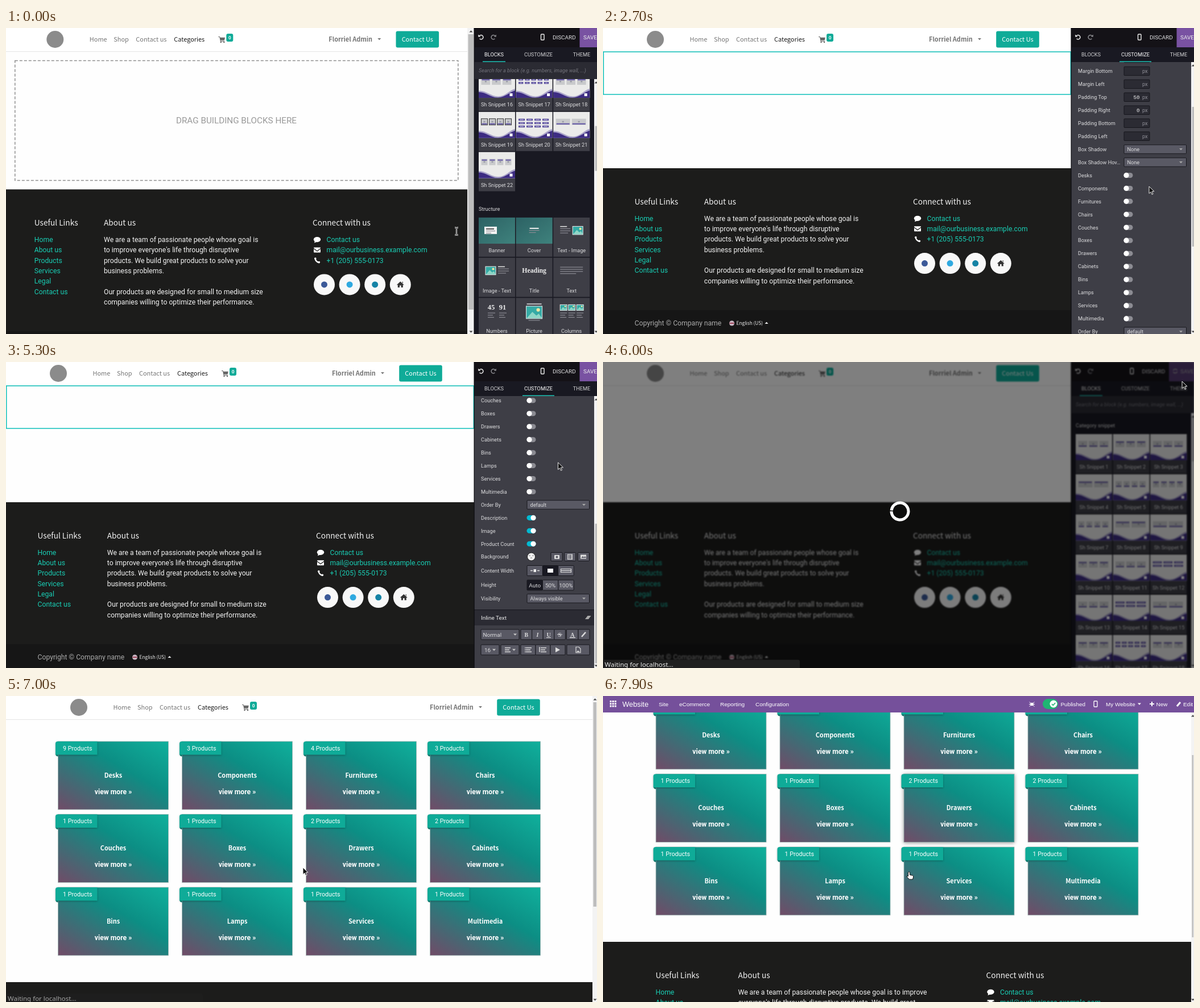
Recreate the animation shown at these times as an HTML page. Size 1039 by 539 pixels, loop 8 s.

```html
<!DOCTYPE html>
<html lang="en">
<head>
<meta charset="utf-8">
<title>Website builder</title>
<style>
html, body { margin: 0; width: 100%; height: 100%; overflow: hidden; background: #fefefe; }
svg { display: block; }
text { font-family: Roboto, sans-serif; white-space: pre; }
.s { font-family: "Noto Sans CJK SC", "Noto Sans CJK JP", "Noto Sans CJK", sans-serif; }
.a { font-family: "Liberation Sans", sans-serif; }
.n { font-family: "Noto Sans", sans-serif; }
.f { font-family: "Liberation Serif", serif; }
.c { font-family: "Liberation Mono", monospace; }
.b { font-weight: 700; }
.i { font-style: italic; }
.m { text-anchor: middle; }
.e { text-anchor: end; }
</style>
</head>
<body>
<svg width="1039" height="539" viewBox="0 0 1039 539">
  <defs>
    <linearGradient id="card" gradientUnits="userSpaceOnUse" x1="47" y1="147" x2="147" y2="-27">
      <stop stop-color="#714b67"/><stop offset=".6" stop-color="#0c8e84"/><stop offset="1" stop-color="#10b09c"/>
    </linearGradient>
    <linearGradient id="cover" x2="1" y2="1">
      <stop stop-color="#2c6264"/><stop offset="1" stop-color="#3f827d"/>
    </linearGradient>
  </defs>
  <g id="stage"></g>
</svg>
<script>
const TEAL = '#0fab98', LINK = '#19cdb4', PURPLE = '#75509b', INK = '#3d2c82';
const PANEL = '#3e3e46', DARK = '#191922', MID = '#2b2b33', BUTTON = '#595964', LABEL = '#dcdcde';
const SMALL = 9.17, MENU = 9.93, BODY = 12.2, NAV = 10.95;

const rect = (x, y, w, h, fill, more = '') => `<rect x="${x}" y="${y}" width="${w}" height="${h}" fill="${fill}" ${more}/>`;
const circle = (x, y, r, fill, more = '') => `<circle cx="${x}" cy="${y}" r="${r}" fill="${fill}" ${more}/>`;
const path = (d, fill, more = '') => `<path d="${d}" fill="${fill}" ${more}/>`;
const line = (d, color, width = 1.2) => path(d, 'none', `stroke="${color}" stroke-width="${width}"`);
const group = (x, y, body, more = '') => `<g transform="translate(${x} ${y})" ${more}>${body}</g>`;
const clip = (x, y, w, h, body) =>
  `<svg x="${x}" y="${y}" width="${w}" height="${h}" viewBox="${x} ${y} ${w} ${h}">${body}</svg>`;
// y is the middle of the capital letters
const text = (x, y, str, size, fill, cls = '') =>
  `<text x="${x}" y="${y + size * .355}" font-size="${size}" fill="${fill}" class="${cls}">${str}</text>`;
const list = (items, fn) => items.map(fn).join('');
const times = (n, fn) => list([...Array(n).keys()], fn);
const caret = (x, y, color, d = 1) => path(`M${x - 3} ${y - 1.5 * d}h6l-3 ${3.2 * d}z`, color);

// linear interpolation over [time, ...values]
function track(keys, t) {
  const k = keys.findIndex(key => key[0] > t);
  if (k < 0) return keys.at(-1).slice(1);
  const [a, b] = [keys[k - 1], keys[k]], p = (t - a[0]) / (b[0] - a[0]);
  return a.slice(1).map((v, i) => v + (b[i + 1] - v) * p);
}

function scrollbar(x, y, w, bottom, thumbY, thumbH) {
  const mid = x + w / 2 + .5;
  return rect(x, y, w, bottom - y, '#f3f3f3') + rect(x + 1.5, thumbY, w - 2.5, thumbH, '#bdbdbd') +
    caret(mid, y + 6, '#444', -1) + caret(mid, bottom - 4, '#444');
}

// ---------- web page ----------
function nav(dx, right, width) {
  const item = (x, s, fill = '#777') => text(x, 20.3, s, NAV, fill, 's');
  return rect(0, 0, width, 41, '#fff') + rect(0, 41, width, 1, '#e4e4e4') +
    group(dx, 0, circle(92, 20, 15, '#8b8b8b') + item(152.5, 'Home') + item(195, 'Shop') + item(234, 'Contact us') +
      item(301, 'Categories', '#1c1c1c') +
      path('M379 15h2.6l.6 1.8h8.6l-1.2 5h-6.4l.2 1h6.4v1h-7.2l-1.6-7.8H379z', '#666') +
      circle(383.5, 25, 1.2, '#666') + circle(389, 25, 1.2, '#666') +
      rect(393, 10, 12, 14, TEAL, 'rx="3"') + text(399, 17, '0', 8, '#fff', 's b m')) +
    group(right, 0, text(573, 20.3, 'Florriel Admin', NAV, '#757575', 's b') + caret(662, 19.5, '#757575') +
      rect(691.2, 5.5, 75.6, 29, TEAL, 'rx="3"') + text(729, 20.3, 'Contact Us', NAV, '#fff', 's m'));
}

const NARROW = ['We are a team of passionate people whose goal is', "to improve everyone's life through disruptive",
  'products. We build great products to solve your', 'business problems.', '',
  'Our products are designed for small to medium size', 'companies willing to optimize their performance.'];
const WIDE = ['We are a team of passionate people whose goal is to improve',
  "everyone's life through disruptive products. We build great", 'products to solve your business problems.'];

function footer(top, [x1, x2, x3], lines, width) {
  const row = i => 88.3 + 18.35 * i;
  const head = (x, s) => text(x, 58.7, s, 13.65, '#f2f2f2', 's');
  const column = (x, items, fill) => list(items, (s, i) => text(x, row(i), s, BODY, fill));
  return group(0, top, rect(0, 0, width, 700, '#1c1c1b') + rect(0, 250, width, 700, '#161616') +
    head(x1, 'Useful Links') + head(x2, 'About us') + head(x3, 'Connect with us') +
    column(x1, ['Home', 'About us', 'Products', 'Services', 'Legal', 'Contact us'], LINK) +
    column(x2, lines, '#f4f4f4') +
    column(x3 + 24.5, ['Contact us', 'mail@ourbusiness.example.com', '+1 (205) 555-0173'], LINK) +
    group(x3 + 8, row(0), '<ellipse rx="6.2" ry="4.6" fill="#fff"/>' + path('M-4 2l-1 4 5-2z', '#fff')) +
    group(x3 + 8, row(1), rect(-6, -4.5, 12, 9, '#fff', 'rx="1"') + line('M-6-2.5L0 2 6-2.5', '#1c1c1b')) +
    group(x3 + 8, row(2), line('M-3.5-4Q-3 2.5 4 4', '#fff', 2.4) + circle(-3.2, -3.3, 1.8, '#fff') + circle(3.3, 3.3, 1.8, '#fff')) +
    list(['#3b5998', '#2fa9e0', '#1583a5', ''], (color, i) => group(x3 + 20.5 + 44.6 * i, 167.6,
      circle(0, 0, 18.5, '#f8f8f8') + (color ? circle(0, 0, 5.5, color)
        : path('M0-5.5L6.5 .5H4.5V5H1.3V1.5h-2.6V5h-3.2V.5h-2zM2.8-5h1.8v3z', '#333')))) +
    text(x1, 272.7, 'Copyright © Company name', BODY, '#aaa') +
    circle(x1 + 171, 273, 4.5, '#c9b7c4') + rect(x1 + 167, 272, 8, 2, '#a0485c') +
    text(x1 + 179, 272.7, 'English (US)', 8.3, '#f0f0f0', 's') + caret(x1 + 232, 272.5, '#f0f0f0', -1));
}

function editedPage(dropped, selected) {
  if (!dropped) return rect(0, 0, 823, 539, '#fefefe') + nav(-5.7, -5.7, 811) +
    rect(15.8, 57.5, 779, 211, 'none', 'stroke="#8f8f8f" stroke-width="1.5" stroke-dasharray="5 3"') +
    text(405, 163, 'DRAG BUILDING BLOCKS HERE', 15.25, '#999', 'm') +
    footer(284.3, [49.8, 172, 539], NARROW, 811) + scrollbar(811, 0, 12, 539, 11, 485);
  return rect(0, 0, 823, 539, '#fefefe') + nav(0, 0, 823) + footer(247, [55.5, 177.8, 545], NARROW, 823) +
    (selected ? rect(.75, 42, 821.5, 75, 'none', 'stroke="#1cc4bd" stroke-width="1.6"') : '');
}

// ---------- editor: blocks ----------
const cell = (i, top, label, art) => group(831 + i % 3 * 65.6, top + Math.floor(i / 3) * 70.75,
  rect(0, 0, 64, 69, PANEL) + art + text(32, 58, label, SMALL, LABEL, 'm'));

const LAYOUTS = '31 31 31 21 41 41 41 21 21 31 31 32 31 32 21 31 52 31 41 43 21 41'.split(' ');
function snippet(layout, i) {
  const [cols, rows] = [...layout].map(Number), w = 56 / cols;
  const item = k => {
    const x = 4.5 + k % cols * w, y = 12 + Math.floor(k / cols) * 6;
    if (rows > 1) return rect(x, y, w - 3, 3.4, '#54489a') + rect(x + 2, y + 1.2, w - 7, 1, '#c9c5e2');
    return rect(x, y, w - 3, 11, '#c9cacc', i == 18 ? 'stroke="#333"' : '') +
      rect(x + 1, y + (i % 2 ? 1 : 8), w - 5, 2.2, '#6b60a8') + rect(x + w / 2 - 3, y + 4, 3, 2.5, '#989aa6');
  };
  return cell(i, 127, `Sh Snippet ${i + 1}`, rect(0, 0, 64, 46, '#ebebea') + times(cols * rows, item) +
    path('M0 33.5C14 33 22 44 35 43.5S54 32 64 30V46H0Z', '#a9a3c8') +
    path('M0 36C12 35 21 46 34 45.5S54 36 64 33V46H0Z', INK) + rect(54.5, 38, 5, 5, '#fff'));
}

const bars = (x, y, widths) => list(widths, (w, i) => rect(x, y + i * 3.8, w, 1.2, '#8c8c94'));
const picture = (x, y, w, h) => rect(x, y, w, h, '#35aaa5', 'stroke="#eee"') + circle(x + w * .75, y + h * .3, h * .14, '#f6e7a0') +
  path(`M${x + 1} ${y + h - 1}l${w * .35} ${-h * .5} ${w * .25} ${h * .3} ${w * .15} ${-h * .15} ${w * .2} ${h * .35}z`, '#8fd6c6');
const serif = (x, y, s, size) => text(x, y, s, size, '#eee', 'f b m');
const STRUCTURE = {
  'Banner': rect(0, 0, 64, 46, 'url(#cover)') + rect(10, 16, 22, 13, '#f3f3f3') + rect(13, 19, 14, 2, '#555') + bars(13, 23, [16, 9]),
  'Cover': rect(0, 0, 64, 46, 'url(#cover)') + rect(24, 18, 16, 2, '#eee') + bars(23, 22, [18, 12]),
  'Text - Image': rect(12, 15, 12, 1.6, '#ddd') + bars(12, 19, [18, 18, 14]) + picture(34, 15.5, 18, 14.5),
  'Image - Text': picture(12, 15.5, 18, 14.5) + rect(34, 15, 12, 1.6, '#ddd') + bars(34, 19, [19, 19, 14]),
  'Title': serif(32, 22, 'Heading', 11.8),
  'Text': bars(12, 16, [40, 40, 40, 28]),
  'Numbers': serif(22, 16, '45', 12.5) + serif(42, 16, '91', 12.5) + bars(16, 26, [13, 9, 11]) + bars(36, 26, [13, 9, 11]),
  'Picture': rect(19, 10, 26, 1.6, '#ddd') + picture(18, 14.5, 28, 22) + bars(22, 39, [20]),
  'Columns': times(3, i => picture(12 + i * 14.5, 12, 12, 10) + bars(12 + i * 14.5, 26, [12, 9, 11])),
};

function blocks(scroll) {
  return rect(823, 60, 216, 30, MID) +
    text(831, 75, 'Search for a block (e.g. numbers, image wall, ...)', SMALL, '#74747c', 'i') +
    clip(823, 90, 211, 449, group(0, -scroll, text(831, 112, 'Category snippet', SMALL, LABEL) + list(LAYOUTS, snippet) +
      text(831, 722.5, 'Structure', SMALL, LABEL) +
      list(Object.keys(STRUCTURE), (name, i) => cell(i, 737.6, name, STRUCTURE[name])))) +
    scrollbar(1034, 90, 6, 539, 96 + scroll * .19, 79);
}

// ---------- editor: options ----------
const ROWS = ['Columns', 'Border', 'Radius', 'Margin Top', 'Margin Right', 'Margin Bottom', 'Margin Left',
  'Padding Top', 'Padding Right', 'Padding Bottom', 'Padding Left', 'Box Shadow', 'Box Shadow Hov…',
  'Desks', 'Components', 'Furnitures', 'Chairs', 'Couches', 'Boxes', 'Drawers', 'Cabinets', 'Bins', 'Lamps',
  'Services', 'Multimedia', 'Order By', 'Description', 'Image', 'Product Count', 'Background'];
const VALUES = { 'Padding Top': '50', 'Padding Right': '0', 'Order By': 'default' };
const SWITCHED = { 'Description': 4000, 'Image': 4600, 'Product Count': 5100 };

const box = (x, y, w, h, fill, body = '') => rect(x, y - h / 2, w, h, fill, 'stroke="#17171d" rx="1"') + body;
const select = (y, s) => box(916, y, 109.5, 15.5, BUTTON, text(921.5, y, s, SMALL, LABEL) + caret(1016, y, '#aaa'));
const button = (x, y, w, s = '', cls = 'm', fill = BUTTON) => box(x, y, w, 18, fill, text(x + w / 2, y, s, MENU, LABEL, cls));

function option(name, i, t) {
  const y = -38.9 + 22.95 * i, on = t >= SWITCHED[name];
  let control = '';
  if (i < 11) control = box(916, y, 45, 15.5, MID, text(943.5, y, VALUES[name] || '', SMALL, '#eee', 'c e') + text(948, y, 'px', SMALL, '#909098'));
  else if (i < 13 || i == 25) control = select(y, VALUES[name] || 'None');
  else if (i < 29) control = rect(915.5, y - 4.5, 16, 9, on ? '#01bad2' : '#8b8b92', 'rx="4.5"') + circle(on ? 927 : 920, y, 4.6, '#fff');
  return text(835, y, name, SMALL, LABEL) + control;
}

function lowerOptions() {
  const label = (y, s) => text(835, y, s, SMALL, LABEL);
  const lines = (x, y) => line(`M${x} ${y - 3.5}h10m-10 3.5h8m-8 3.5h10`, '#ddd', 1.5);
  return circle(923.5, 343, 7, '#f4f4f4', 'stroke="#222"') + line('M919 341h3m3 0h3m-6 4h3', '#bbb', 2.5) +
    times(3, i => box(958 + i * 23.7, 343, 20, 15, BUTTON)) +
    rect(964, 340, 9, 7, '#ddd', 'rx="1"') + circle(968.5, 343.5, 2, BUTTON) +
    line('M987.5 339v8.5h8V339zM990 339v9m3.5-9v9', '#ddd') + rect(1010, 339.5, 10, 7, '#ddd') + path('M1011 345l3-3 2 2 2-2 2 3z', BUTTON) +
    label(367.5, 'Content Width') + times(3, i => button(916 + i * 27.4, 367.5, 27.4, '', 'm', i == 1 ? DARK : BUTTON)) +
    line('M922 367.5h4m8 0h4m38 0h17', '#ddd', 1.5) + rect(927.5, 365, 4.5, 5, '#eee') + rect(952, 364, 10, 7, '#fff') +
    line('M975.5 364.5h18v6h-18z', '#ddd') +
    label(393, 'Height') + list(['Auto', '50%', '100%'], (s, i) => button(916 + i * 27.4, 393, 27.4, s, 'm', i ? BUTTON : DARK)) +
    label(416.5, 'Visibility') + select(416.5, 'Always visible') +
    rect(823, 436, 211, 28, MID) + rect(823, 436, 211, 1, '#17171d') + text(835, 450.5, 'Inline Text', MENU, '#eee') +
    path('M1018 453l4.5-6h6l-4.5 6z', '#aaa') +
    box(835, 480, 67, 18, BUTTON, text(838.5, 480, 'Normal', MENU, LABEL) + caret(895, 480, '#ccc')) +
    list([...'BIUS'], (s, i) => button(905 + i * 19.6, 480, 19.6, s, 'f b m' + (i == 1 ? ' i' : ''))) +
    line('M950 485.5h8m11-5.5h9', '#ddd') +
    button(985.5, 480, 20.5, 'A', 'f b m') + line('M991 485.5h10', '#eee') +
    button(1006, 480, 20, '') + line('M1012 484l7-8', '#ddd', 2.4) +
    box(835, 507, 32, 18, BUTTON, text(841, 507, '16', MENU, LABEL) + caret(858, 507, '#ccc')) +
    box(870, 507, 32, 18, BUTTON, lines(877, 507) + caret(893, 507, '#ccc')) +
    times(3, i => button(905 + i * 26, 507, 26)) + lines(914, 507) + lines(940, 507) +
    line('M912 503.5h1.5m-1.5 3.5h1.5m-1.5 3.5h1.5M938 502v9', '#ddd', 1.5) + path('M966 502.5l8 4.5-8 4.5z', '#ddd') +
    button(986, 507, 40) + line('M1002 502h5l3 3v7h-8z', '#ddd') + path('M1003 511l2.5-3 3.5 3z', '#ddd');
}

function customize(t) {
  const [scroll] = track([[0, 0], [2400, 0], [2700, 136], [3300, 419.4]], t);
  return rect(823, 60, 216, 479, PANEL) + clip(823, 60, 211, 479, group(0, 136 - scroll,
    rect(823, -76, 211, 25, MID) + text(835, -63, 'Category snippet', MENU, '#eee') +
    list(ROWS, (name, i) => option(name, i, t)) + group(0, 283.4, lowerOptions()))) +
    scrollbar(1034, 60, 6, 539, 69 + scroll * .5145, 246);
}

function sidebar(t, saving) {
  const customizing = t >= 1900 && !saving, dx = saving ? -13.5 : 0;
  const turn = (x, flip, color) => group(x, 16, `<g transform="scale(${flip} 1)">` +
    line('M-2.6-2.2A3.7 3.7 0 1 1-2.4 2.8', color, 1.5) + path('M-4.8-4.6v4.2h4.2z', color) + '</g>');
  const tab = (x, s, half, on) => text(x, 47, s, SMALL, on ? '#fff' : '#d2d2d4', 'm') +
    (on ? rect(x - half, 58.5, half * 2, 1.8, '#1cc1b4') : '');
  const save = rect(1008.5 + dx, 0, 60, 34, '#7952a2') + text(1015, 16.5, 'SAVE', MENU, '#eee') +
    (saving ? group(1006, 16, line('M-3.5-1A3.8 3.8 0 0 1 3.5-1.5M3.5 1A3.8 3.8 0 0 1-3.5 1.5', '#eee', 1.5)) : '');
  return rect(823, 0, 216, 539, DARK) + rect(823, 0, 216, 34, '#141217') +
    turn(835, 1, '#eee') + turn(857, -1, '#8c8c90') +
    group(dx, 0, rect(940.5, 11, 5.5, 10, 'none', 'stroke="#eee" stroke-width="1.4" rx="1"') +
      text(961, 16.5, 'DISCARD', MENU, '#e4e4e6')) +
    `<g opacity="${saving ? .65 : 1}">${save}</g>` +
    tab(858, 'BLOCKS', 20, !customizing) + tab(936, 'CUSTOMIZE', 28, customizing) + tab(1012, 'THEME', 18, false) +
    (customizing ? customize(t) : blocks(saving ? 0 : 403.7)) + rect(822.5, 0, 1.2, 539, '#0c0c10');
}

const status = opacity => `<g opacity="${opacity}">` + rect(-3, 524.5, 349, 18, '#202020', 'rx="3"') +
  text(3, 532.5, 'Waiting for localhost…', 11.5, '#ececec', 'n') + '</g>';

function editor(t) {
  const saving = t >= 5700;
  const view = editedPage(t >= 1100, t >= 1800 && !saving) + sidebar(t, saving);
  if (t < 5900) return view;
  return `<g style="filter:blur(1.2px)">${view}</g>` + rect(0, 0, 1039, 539, '#000', 'opacity=".5"') +
    circle(522, 263, 15, 'none', `stroke="#fff" stroke-width="5" stroke-dasharray="92 2.25" transform="rotate(${186 + (t - 6000) * .36} 522 263)"`) +
    (t >= 6000 ? status(1) : '');
}

// ---------- published page ----------
const CATEGORIES = [['Desks', 9], ['Components', 3], ['Furnitures', 4], ['Chairs', 3], ['Couches', 1], ['Boxes', 1],
  ['Drawers', 2], ['Cabinets', 2], ['Bins', 1], ['Lamps', 1], ['Services', 1], ['Multimedia', 1]];
const shadow = (y, blur, alpha) => `style="filter:drop-shadow(0 ${y}px ${blur}px rgba(0,0,0,${alpha}))"`;

function category([name, count], i, hovered) {
  return group(91.5 + i % 4 * 218, 80 + Math.floor(i / 4) * 128.5,
    rect(0, 0, 194, 120, 'url(#card)', 'stroke="#9fb3b1" stroke-width=".8" ' + (hovered ? shadow(1, 3, .4) : '')) +
    path('M-4 22v2q1 2.5 4 2.5v-4z', '#0a8577') +
    path('M-4.5 4q0-4 4-4H69V23.5H-4.5z', TEAL, shadow(1, 1.5, .3)) +
    text(8.5, 12, `${count} Products`, 10.7, '#fff') +
    text(97, 59.8, name, NAV, '#fff', 's b m') + text(97, 88.5, 'view more »', BODY, '#fff', 'b m'));
}

function topBar() {
  const item = (x, s) => text(x, 14, s, MENU, '#fff', 'a');
  return rect(0, 0, 1039, 29, PURPLE) + times(9, i => rect(12 + i % 3 * 4.2, 8 + Math.floor(i / 3) * 4.2, 3, 3, '#fff')) +
    text(34, 14, 'Website', 12.8, '#fff', 'a') +
    item(98, 'Site') + item(134, 'eCommerce') + item(206, 'Reporting') + item(268, 'Configuration') +
    circle(754, 14.5, 2.8, '#fff') + line('M749.5 10.5l9 8m-9 0l9-8m-9.5 4h10', '#fff', 1) +
    rect(773, 5, 27, 18, '#1fb573', 'rx="9"') + circle(792, 14, 6.5, '#fff') + line('M789 14l2.3 2.3 4-4.3', '#1fb573', 1.6) +
    item(804.5, 'Published') + rect(863, 9, 6, 10, 'none', 'stroke="#fff" stroke-width="1.3" rx="1"') +
    item(884, 'My Website') + caret(943, 14, '#fff') + line('M961 14h8m-4-4v8', '#fff', 2) + item(972.5, 'New') +
    line('M1009 18l6-7', '#fff', 3) + item(1020, 'Edit');
}

function published(t) {
  const bar = t >= 7300 ? 29 : 0, width = bar ? 1034 : 1031;
  const [scroll] = track([[0, 0], [7600, 0], [7900, 100]], t);
  return rect(0, 0, 1039, 539, '#fefefe') +
    group(bar && 1.5, bar - scroll, group(-2, 0, nav(38, 174, width + 2)) +
      list(CATEGORIES, (c, i) => category(c, i, bar && c[0] == 'Drawers')) +
      group(-2, 0, footer(504, [93, 238, 674], WIDE, width + 2))) +
    scrollbar(width, bar, 1039 - width, 539, bar ? 40 + scroll * .64 : 11, bar ? 321 : 360) +
    (bar ? topBar() : '') + (t < 7100 ? status(t < 7000 ? 1 : .65) : '');
}

// ---------- pointer ----------
const MOVES = [[0, 792, 358], [300, 792, 358], [400, 796, 348], [500, 796, 348], [800, 884, 220], [900, 884, 220],
  [1100, 518, 121], [1200, 518, 121], [1400, 472, 87], [1600, 466, 73], [1700, 466, 73], [2400, 961, 272], [2700, 960, 279],
  [3300, 951, 248], [3400, 951, 248], [3800, 923, 270], [3900, 923, 270], [4200, 925, 299], [4300, 925, 299], [4400, 925, 298],
  [4500, 925, 298], [4800, 924, 321], [5000, 924, 321], [5600, 1017, 33], [6000, 1018, 34], [6500, 1018, 34],
  [7000, 522, 302], [7200, 522, 302], [7500, 538, 310]];

function pointer(t) {
  const [x, y] = track(MOVES, t);
  const hand = (t >= 700 && t < 1100) || (t >= 3800 && t < 5200) || t >= 7300;
  if (t < 600) {
    const beam = 'M-3-6.5Q0-6.5 0-5Q0-6.5 3-6.5M0-5V5M-3 6.5Q0 6.5 0 5Q0 6.5 3 6.5';
    return group(x, y, line(beam, '#eee', 2.4) + line(beam, '#111', .8));
  }
  return group(x, y, hand
    ? path('M-1.5 .5Q0-1 1.4 .5V5L6.5 6.2Q8 6.8 7.6 9L6.5 13H.5L-4 8.2Q-3.6 6-1.5 7.5Z', '#fff', 'stroke="#111"')
    : path('M0 0V12.4L3 9.8 5 14.2 7 13.3 5 9 9 8.8Z', '#111', 'stroke="#fff" stroke-width=".9"'));
}

const stage = document.getElementById('stage'), start = performance.now();
let shown = -1;
function draw() {
  const t = Math.floor((performance.now() - start) % 8000 / 100) * 100;
  if (t != shown) stage.innerHTML = (t < 6900 ? editor(t) : published(t)) + pointer(t);
  shown = t;
  requestAnimationFrame(draw);
}
draw();
</script>
</body>
</html>
```
